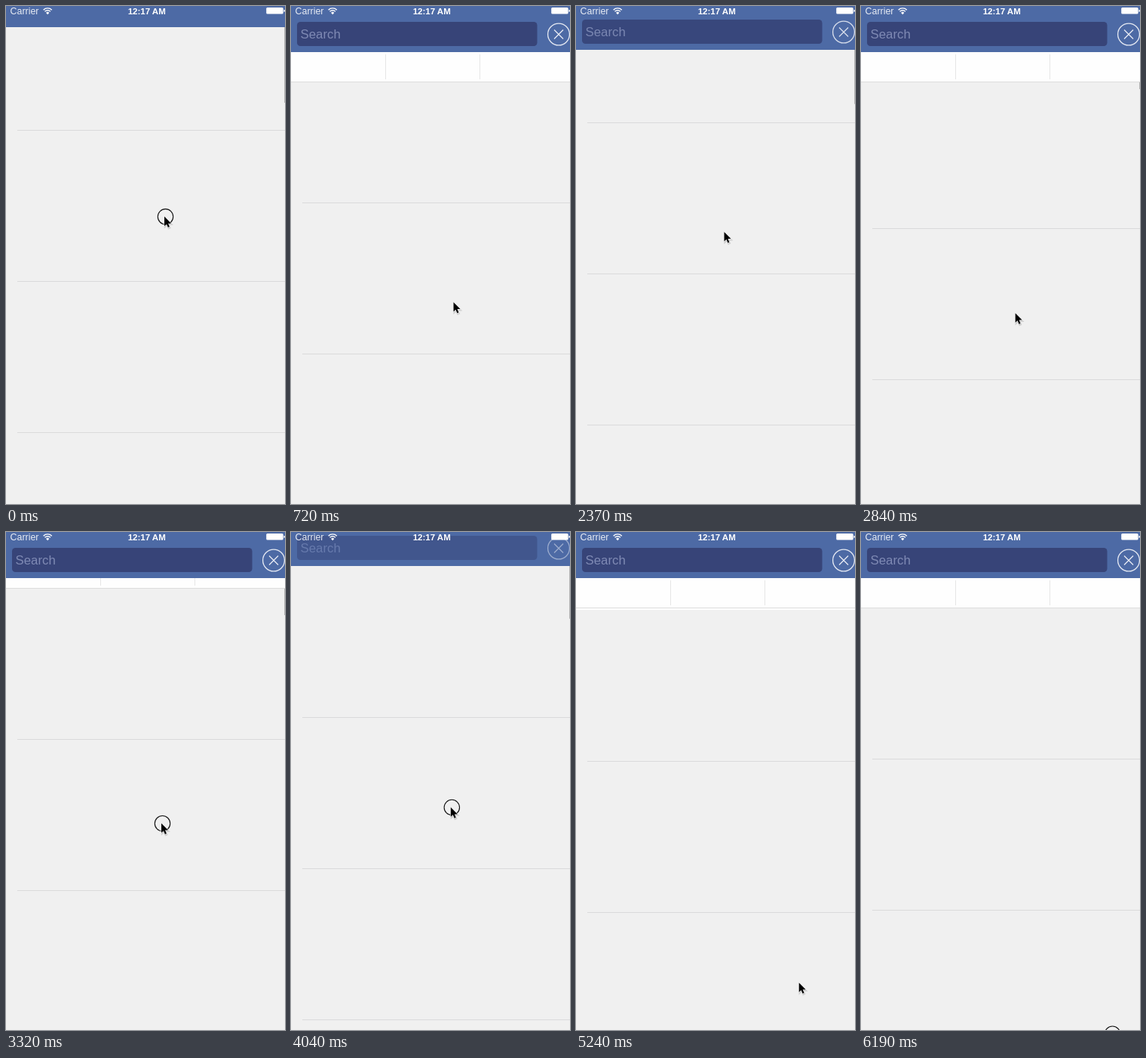
Write an HTML page that moves like this. It is 370x659 px and loops after 6.29 s.

```html
<!DOCTYPE html>
<html lang="en">
<head>
<meta charset="utf-8">
<title>Collapsing search bar</title>
<style>
  html, body { margin: 0; width: 100%; height: 100%; overflow: hidden; background: #fefefe; }
  svg { display: block; width: 100vw; height: 100vh; }
  text { font-family: "Liberation Sans", Arial, sans-serif; }
</style>
</head>
<body>
<svg viewBox="0 0 370 659">
  <defs>
    <path id="arrow" d="M0 0V12.6L2.9 9.8L4.9 14.4L6.9 13.5L5 9.1H9Z"/>
  </defs>
  <rect width="370" height="659" fill="#fefefe"/>
  <g id="list">
    <rect width="370" height="1200" fill="#f0f0f0"/>
    <path d="M15 200.5H370M15 400.5H370M15 600.5H370M15 800.5H370" stroke="#dadadb"/>
  </g>
  <rect id="thumb" x="369" width="1" height="108" fill="#b4b4b4"/>

  <g id="tabs">
    <rect y="61" width="370" height="39" fill="#fefefe"/>
    <path d="M0 100.5H370" stroke="#dcdcdc"/>
    <path d="M125.5 64V97M250.5 64V97" stroke="#e6e6e6"/>
  </g>

  <rect id="nav" width="370" fill="#4d6aa5"/>
  <g id="search">
    <rect x="8" y="21" width="318.5" height="32" rx="4.5" fill="#374478"/>
    <text x="12.6" y="42.8" font-size="16.8" fill="#7f8ab4">Search</text>
    <g fill="none" stroke="#e6eaf3" stroke-width="1.3">
      <circle cx="355" cy="37.5" r="14.4"/>
      <path d="M349 31.5l12 12M361 31.5l-12 12"/>
    </g>
  </g>

  <g fill="#fff">
    <text x="5.6" y="11" font-size="12.4" fill="#e8ecf4">Carrier</text>
    <text x="186.7" y="11" font-size="11.5" font-weight="bold" text-anchor="middle">12:17 AM</text>
    <path d="M55.2 11.2l-2.1-2.3a3 3 0 0 1 4.2 0z"/>
    <path d="M49.6 5.2a8 8 0 0 1 11.2 0M51.5 7.3a5.2 5.2 0 0 1 7.4 0" fill="none" stroke="#fff" stroke-width="1.4"/>
    <rect x="345.2" y="2" width="22.4" height="8.6" rx="1.5"/>
    <path d="M368.4 4.7a1.6 1.6 0 0 1 0 3.2z"/>
  </g>

  <g id="pointer">
    <circle id="press" cx="1.5" cy=".2" r="10.2" fill="none" stroke="#111" stroke-width="1.1"/>
    <use href="#arrow" x=".7" y="1.5" stroke="#000" stroke-width="1.8" opacity=".13"/>
    <use href="#arrow" stroke="#fff" stroke-width="1" paint-order="stroke"/>
  </g>
</svg>
<script>
const LOOP = 6290, STEP = 118.6;
const BAR_MIN = 16, NAV_MAX = 61, BAR_MAX = 100;

const el = id => document.getElementById(id);
const set = (id, attrs) => { for (const k in attrs) el(id).setAttribute(k, attrs[k]); };
const clamp = (v, a, b) => Math.min(b, Math.max(a, v));
const mix = (a, b, p) => a + (b - a) * p;

const line = p => p;
const speedUp = p => p * p;
const slowDown = p => p * (2 - p);
const smooth = p => p * p * (3 - 2 * p);

// Each pose: step, list top, pointer x and y, finger down, easing to the next pose.
const poses = [
  [0, -36, 210, 278.6, true, slowDown],
  [6, 60, 215.5, 392, false, line],
  [8, 60, 215.5, 392, true, line],
  [14, -33, 213.5, 292, false, slowDown],
  [17, -88, 209, 258, true, speedUp],
  [20, -46, 196.5, 299, false, slowDown],
  [25, 100, 205, 411, true, speedUp],
  [28, 74, 206, 385.5, true, slowDown],
  [31, 16, 208, 327, false, line],
  [33, 16, 208, 327, true, slowDown],
  [39, 112, 220.5, 449, false, line],
  [40, 112, 220.5, 449, false, smooth],
  [46, 100, 322, 648, false, line],
  [47, 100, 322, 648, false, line],
  [49, 100, 332, 664, false, line],
  [52, 100, 332, 664, true, line]
].map(([step, top, x, y, down, ease]) => ({ step, top, x, y, down, ease }));

// The bar follows the list within its limits; overscroll leaves it open.
const follow = (from, top) =>
  clamp(from.bar + Math.min(top, BAR_MAX) - Math.min(from.top, BAR_MAX), BAR_MIN, BAR_MAX);

poses[0].bar = 28;
for (let n = 1; n < poses.length; n++) poses[n].bar = follow(poses[n - 1], poses[n].top);

function draw(t) {
  const i = Math.floor((t + 6) / STEP);
  const n = poses.findLastIndex(p => p.step <= i);
  const a = poses[n], b = poses[n + 1] || a;
  const p = a.ease((i - a.step) / (b.step - a.step || 1));

  const top = Math.round(mix(a.top, b.top, p));
  const bar = follow(a, top), nav = Math.min(bar, NAV_MAX);
  const scrolling = a.top !== b.top && top < BAR_MAX;

  set('list', { transform: `translate(0 ${top})` });
  set('thumb', {
    y: 2 + Math.max(0, 74 - top) * 0.164,
    visibility: scrolling ? 'visible' : 'hidden'
  });
  set('tabs', {
    transform: `translate(0 ${bar - BAR_MAX})`,
    visibility: bar > NAV_MAX ? 'visible' : 'hidden'
  });
  set('nav', { height: nav });
  set('search', {
    transform: `translate(0 ${nav - NAV_MAX})`,
    opacity: clamp((nav - 28) / 33, 0, 1)
  });
  set('pointer', { transform: `translate(${mix(a.x, b.x, p)} ${mix(a.y, b.y, p)})` });
  set('press', { visibility: a.down ? 'visible' : 'hidden' });
}

const start = performance.now();
function tick() {
  draw((performance.now() - start) % LOOP);
  requestAnimationFrame(tick);
}
tick();
</script>
</body>
</html>
```
